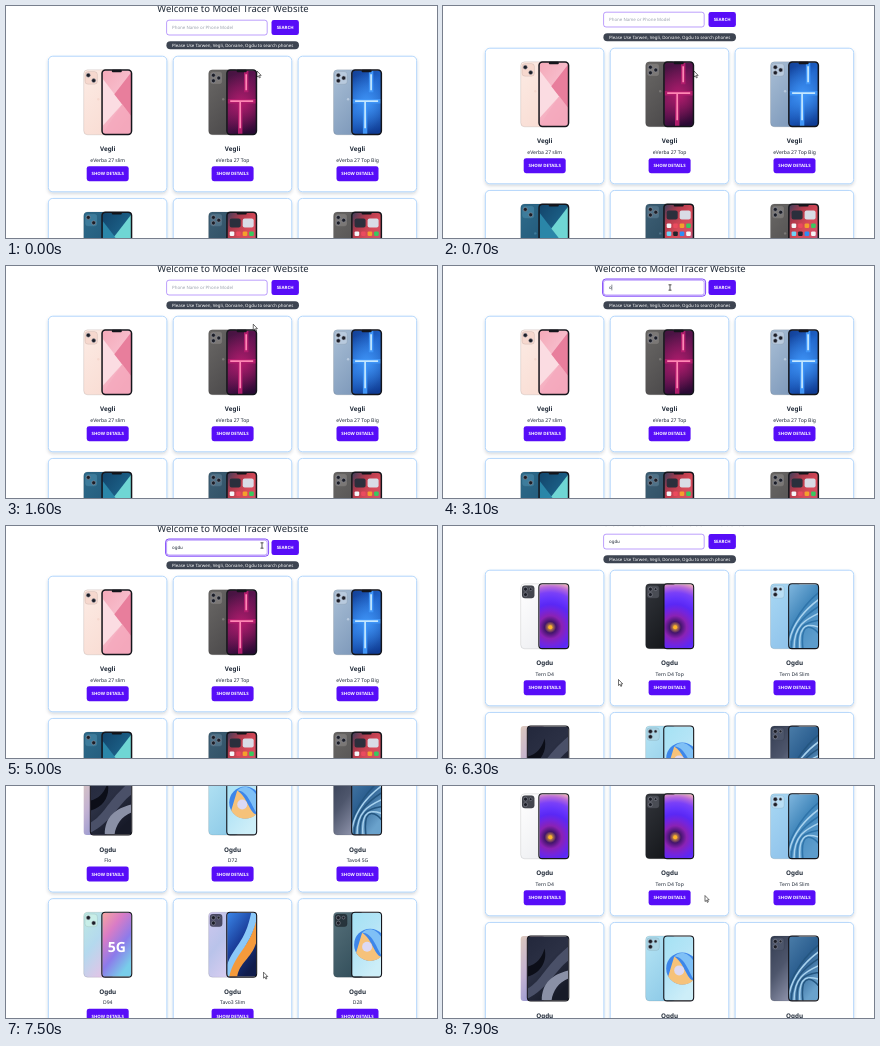
An HTML page that plays this animation: 431x232 px, repeating every 8 s.

```html
<!DOCTYPE html>
<html lang="en">
<head>
<meta charset="utf-8">
<title>Phone search</title>
<style>
  html, body { margin: 0; height: 100%; overflow: hidden; background: #fff; }
  #stage { display: block; width: 100vw; height: 100vh; }
  text { font-family: "Noto Sans", "Open Sans", sans-serif; fill: #1f2937; text-rendering: geometricPrecision; white-space: pre; }
  .mid { text-anchor: middle; }
  .btn { font-size: 4.42px; font-weight: 600; fill: #fff; }
</style>
</head>
<body>
<svg id="stage" viewBox="0 0 431 232" preserveAspectRatio="none">
  <defs id="defs">
    <filter id="shadow" x="-10%" y="-10%" width="120%" height="125%">
      <feDropShadow dx="0" dy="1.8" stdDeviation="1.4" flood-color="#334155" flood-opacity=".2"/>
    </filter>
  </defs>
  <g id="page"></g>
  <g id="cursor"></g>
</svg>
<script>
const LOOP = 8000, STEP = 100;
const PRIMARY = '#570df8';
const $ = id => document.getElementById(id);

// ---------- drawing helpers ----------
const rect = (x, y, w, h, r, fill, extra = '') =>
  `<rect x="${x}" y="${y}" width="${w}" height="${h}" rx="${r}" fill="${fill}" ${extra}/>`;
const circle = (x, y, r, fill, extra = '') => `<circle cx="${x}" cy="${y}" r="${r}" fill="${fill}" ${extra}/>`;
const path = (d, fill, extra = '') => `<path d="${d}" fill="${fill}" ${extra}/>`;
const beam = (d, color, width) => path(d, 'none', `stroke="${color}" stroke-width="${width}"`);
const label = (x, y, size, str, extra = '') => `<text x="${x}" y="${y}" font-size="${size}" ${extra}>${str}</text>`;
const button = (cx, y, w, str, fill) =>
  rect(cx - w / 2, y, w, 15, 2.4, fill) + `<text class="mid btn" x="${cx}" y="${y + 9.1}">${str}</text>`;

let gradients = 0;
const stops = colors => colors.map((c, i) =>
  `<stop offset="${i / (colors.length - 1)}" stop-color="${c}"/>`).join('');
function gradient(...colors) {
  const id = 'g' + gradients++;
  $('defs').insertAdjacentHTML('beforeend',
    `<linearGradient id="${id}" x2=".6" y2="1">${stops(colors)}</linearGradient>`);
  return `url(#${id})`;
}
function radial(cx, cy, r, ...colors) {
  const id = 'g' + gradients++;
  $('defs').insertAdjacentHTML('beforeend',
    `<radialGradient id="${id}" gradientUnits="userSpaceOnUse" cx="${cx}" cy="${cy}" r="${r}">${stops(colors)}</radialGradient>`);
  return `url(#${id})`;
}

// ---------- wallpapers, on a 29 x 64 screen ----------
const fillScreen = (...colors) => rect(0, 0, 29, 64, 0, gradient(...colors));

const folds = (base, light, dark, accent) => fillScreen(...base) +
  path('M0 8L20 34L0 56Z', light) + path('M29 2L12 24L29 46Z', dark) +
  path('M0 64L20 34L29 46V64Z', accent, 'opacity=".8"');

const beams = (base, glow, core) => fillScreen(...base) +
  rect(0, 0, 29, 64, 0, radial(15, 33, 30, glow, glow + '00')) +
  beam('M19 0V22M0 31H29M13 31V64', glow, 4.4) +
  beam('M19 4V20M3 31H26M13 31V58', core, 1.7);

function homeScreen() {
  const colors = ['#f5f5f7', '#39c860', '#2e8df5', '#f4a02c', '#20242c', '#ea4b5e', '#6fd3f7'];
  let icons = rect(2.5, 6, 11, 9, 2, '#2b2f3c') + rect(15.5, 6, 11, 9, 2, '#d9dce6');
  for (let i = 0; i < 16; i++)
    icons += rect(2.5 + i % 4 * 6.5, 19 + (i >> 2) * 8, 4.6, 4.6, 1.2, colors[i * 5 % 7]);
  icons += rect(1.2, 55, 26.6, 7.5, 2, '#d5d9e8', 'opacity=".55"');
  for (let i = 0; i < 4; i++) icons += rect(2.5 + i * 6.5, 56.4, 4.6, 4.6, 1.2, colors[(i + 1) * 3 % 7]);
  return fillScreen('#3a3f5c', '#b03a4c', '#d84a58', '#d0506a', '#5c8ce0') +
    path('M29 34C14 36 6 46 4 55H29Z', '#4f86dc') + icons;
}

const eye = () => rect(0, 0, 29, 64, 0, radial(11, 43, 46,
  '#ffc030', '#43156c', '#8a22b4', '#7424dc', '#5a28f5', '#6634fc', '#7a40f8', '#b468dc', '#f6b8b4')) +
  circle(11, 43, 2, '#ffb52b');

const waves = (base, a, b) => fillScreen(...base) +
  [0, 1, 2, 3, 4, 5, 6].map(i => beam(`M${i * 3 - 4} 66C${-2 + i * 2} ${50 - i * 3} ${8 + i * 3} ${26 + i * 3} 30 ${8 + i * 7}`,
    i % 2 ? a : b, 1.5)).join('');

const disc = () => fillScreen('#a5e2f4', '#b4e4f6', '#cdeef8') +
  circle(18, 32, 16, '#3d86ea') + path('M4 40A16 16 0 0 0 29 44C22 42 20 26 10 20Z', '#f6c27a') +
  path('M10 20C20 20 24 34 29 42V24C24 16 16 14 10 20Z', '#7fc0f6') + circle(15, 34, 5, '#dcd9f4');

const flame = () => fillScreen('#3a86e8', '#1b3f9c', '#101c4c') +
  path('M0 64C4 40 22 40 29 6V30C24 46 12 50 10 64Z', '#f49a3c') +
  path('M0 52C6 34 18 30 24 0H29V8C22 36 8 40 2 64H0Z', '#8bc8f8');

const fiveG = () => fillScreen('#f6a7a0', '#d97cc6', '#8c7bea', '#78cdea') +
  label(14.5, 39, 14, '5G', 'class="mid" font-weight="700" style="fill:#fff"');

// ---------- devices, in card coordinates ----------
function camera(kind, color) {
  const lens = (x, y, r = 2) => circle(x, y, r, '#1b1d26', 'stroke="#9a9da8" stroke-width=".5"');
  const plate = rect(36.7, 15.4, 12.4, 12.6, 3, color, 'stroke="#0003" stroke-width=".4"');
  const lenses = {
    two: lens(40, 19) + lens(45.4, 24.4),
    three: lens(40.2, 19) + lens(40.2, 24.6) + lens(45.6, 21.8),
    tall: lens(40.2, 19) + lens(40.2, 24.4) + lens(45.4, 19, 1.4),
  };
  return plate + lenses[kind];
}

const screen = (x, w, art, bezel) =>
  `<svg x="${x + 1}" y="14" width="${w - 2}" height="64" viewBox="0 0 29 64" preserveAspectRatio="none">${art}</svg>` +
  rect(x + bezel / 2, 13 + bezel / 2, w - bezel, 66 - bezel, 3.4, 'none', `stroke="#14151b" stroke-width="${bezel}"`);

function phone({ back, cam, plate, art, notch }) {
  return rect(35.4, 13.6, 30, 65, 4, gradient(...back), 'stroke="#0003" stroke-width=".5"') +
    camera(cam, plate) +
    (notch ? circle(50, 43, 1.2, plate) : '') +
    screen(53, 31, art, notch ? 1.5 : 1.1) +
    (notch ? rect(63.5, 13.6, 10, 2.4, 1, '#14151b') : '');
}

const tablet = () => rect(35.4, 13.6, 24, 65, 3, gradient('#dcc8bc', '#c3b2d2', '#8f94d0')) +
  screen(41.5, 42.5, fillScreen('#23283c', '#2b3044', '#171a28') +
    path('M0 52C10 44 12 30 29 10V24C20 34 14 52 0 62Z', '#4a5068') +
    path('M10 64C10 46 18 38 29 34V42C22 46 18 54 17 64Z', '#8a90a6') +
    path('M0 30C6 28 10 22 12 12C14 24 10 36 0 40Z', '#0c0e18'), 1.1);

const A = 'Vegli', B = 'Ogdu';
const dark = ['#6a6866', '#4c4a4b'], navy = ['#3e6076', '#27465a'];
const steel = ['#7fb6de', '#4388bc', '#5c9ccc'], night = ['#4a7ca8', '#2c5f90', '#6aa2cc'];
const catalog = {
  [A]: [
    ['eVerba 27 slim', phone({ back: ['#fcebe4', '#f9ddd4'], cam: 'two', plate: '#f6d8ce', notch: 1,
      art: folds(['#f4a9b8', '#f7bccb', '#f3a0b4'], '#fbdce2', '#e87e9c', '#f6aabe') })],
    ['eVerba 27 Top', phone({ back: dark, cam: 'three', plate: '#7b7876', notch: 1,
      art: beams(['#43143f', '#5c1450', '#2a0a34'], '#b01c6c', '#ff86b4') })],
    ['eVerba 27 Top Big', phone({ back: ['#a9bfd6', '#7f9abb'], cam: 'three', plate: '#b8cade', notch: 1,
      art: beams(['#123e94', '#1e62c8', '#0f3c94'], '#3f94f6', '#c4e8ff') })],
    ['eVerba 27', phone({ back: ['#2f6c8c', '#1d5374'], cam: 'two', plate: '#3d7c9c', notch: 1,
      art: folds(['#12446a', '#1b5f86', '#1c6f9c'], '#2a86a8', '#6fd6d4', '#c996c0') })],
    ['eVerba 26 Top Big', phone({ back: navy, cam: 'three', plate: '#4f7187', notch: 1, art: homeScreen() })],
    ['eVerba 26 Top', phone({ back: dark, cam: 'three', plate: '#7b7876', notch: 1, art: homeScreen() })],
  ],
  [B]: [
    ['Tern D4', phone({ back: ['#ffffff', '#eeeff2'], cam: 'tall', plate: '#44464e', art: eye() })],
    ['Tern D4 Top', phone({ back: ['#32353b', '#15171b'], cam: 'tall', plate: '#494c54', art: eye() })],
    ['Tern D4 Slim', phone({ back: ['#a8d8f4', '#8fc2ea'], cam: 'tall', plate: '#b9def5', art: waves(steel, '#a8d2ee', '#2f74aa') })],
    ['Flo', tablet()],
    ['D72', phone({ back: ['#b5e4f4', '#8fcbe8'], cam: 'tall', plate: '#a9d3e4', art: disc() })],
    ['Tavo4 5G', phone({ back: ['#343d52', '#4e566c', '#8d92aa'], cam: 'tall', plate: '#4c556a', art: waves(night, '#a8d2ee', '#245680') })],
    ['D94', phone({ back: ['#bde9e2', '#b4d9ee', '#e3c3e6'], cam: 'two', plate: '#c8eee8', art: fiveG() })],
    ['Tavo3 Slim', phone({ back: ['#cfc7ee', '#b9c3ea', '#d8cdf0'], cam: 'tall', plate: '#4c4c66', art: flame() })],
    ['D28', phone({ back: ['#56707a', '#34505c'], cam: 'tall', plate: '#27343c', art: disc() })],
  ],
};

const card = (brand, [name, art], i) => `<g transform="translate(${42.3 + i % 3 * 124.9} ${50.2 + Math.floor(i / 3) * 142.2})">
  ${rect(0, 0, 118.6, 135.6, 4.5, '#fff', 'stroke="#b2d6fc" stroke-width="1" filter="url(#shadow)"')}${art}
  ${label(59.4, 95.3, 6.31, brand, 'class="mid" font-weight="600"')}
  ${label(59.4, 105.5, 5.05, name, 'class="mid"')}
  ${button(59.4, 110, 42, 'SHOW DETAILS', PRIMARY)}</g>`;
const results = brand => `<g id="${brand}">${catalog[brand].map((item, i) => card(brand, item, i)).join('')}</g>`;

$('page').innerHTML =
  label(227, 6, 9.5, 'Welcome to Model Tracer Website', 'class="mid"') +
  rect(159.6, 13, 103, 17.2, 3.2, 'none', `id="focus" stroke="${PRIMARY}" stroke-width=".75"`) +
  rect(160.6, 14.2, 100.6, 14.8, 2.4, '#fff', `stroke="${PRIMARY}" stroke-width=".4"`) +
  label(166, 23.2, 4.42, '', 'id="query"') +
  rect(166, 18.6, .5, 5.8, 0, '#1f2937', 'id="caret"') +
  button(279.2, 14.1, 27.4, 'SEARCH', PRIMARY) +
  rect(160.4, 35.3, 132.6, 7.9, 3.95, '#3d4451') +
  label(226.7, 40.8, 4.42, `Please Use Tarwen, ${A}, Dorvane, ${B} to search phones`, 'class="mid" style="fill:#fff"') +
  results(A) + results(B) +
  button(226.7, 485.6, 27, 'SEE ALL', '#f000b8');

const outline = 'stroke="#111" stroke-width=".6" stroke-linejoin="round"';
const pointers = {
  arrow: path('M0 0V6L1.4 4.8L2.3 6.9L3.3 6.5L2.4 4.4H4.2Z', '#fff', outline),
  beam: beam('M-1.5 -2.7H1.5M0 -2.7V2.7M-1.5 2.7H1.5', '#111', .7),
  hand: path('M-.7 0H.6V2.4L3.2 3.2V5L2.3 7H-1.2L-2.8 4.4L-2 3.8L-.7 4.6Z', '#fff', outline),
};

// ---------- timeline ----------
const scrollKeys = [[600, 0], [1060, 66], [1500, 0], [6000, 0], [6300, 6], [6400, 30], [6500, 30], [6800, 280], [7300, 280], [7900, 56]];
const cursorKeys = [[1500, 251, 65], [1900, 227, 21.5], [4500, 227, 21.5], [5000, 256, 19.5], [5400, 279, 20],
  [5450, 279, 20], [5800, 175.5, 153.5], [6400, 175.5, 153.5], [6800, 256, 213], [7300, 256, 213], [7900, 262, 109.5]];
const typedAt = [3100, 3600, 3800, 4000];

function tween(keys, t) {
  const next = keys.findIndex(k => k[0] > t);
  if (next < 0) return keys.at(-1).slice(1);
  if (next === 0) return keys[0].slice(1);
  const a = keys[next - 1], b = keys[next];
  const p = (t - a[0]) / (b[0] - a[0]), e = p * p * (3 - 2 * p);
  return a.slice(1).map((v, i) => v + (b[i + 1] - v) * e);
}
const within = (t, from, to) => t >= from && t < to;
const show = (id, on) => $(id).setAttribute('visibility', on ? 'visible' : 'hidden');

function render(t) {
  const [scroll] = tween(scrollKeys, t), [x, y] = tween(cursorKeys, t);
  $('page').setAttribute('transform', `translate(0 ${-scroll})`);

  const query = B.toLowerCase().slice(0, typedAt.filter(k => t >= k).length);
  $('query').textContent = query || 'Phone Name or Phone Model';
  $('query').style.fill = query ? '#1f2937' : '#9ca3af';
  $('caret').setAttribute('x', 166 + (query ? $('query').getComputedTextLength() : 0));
  show('caret', within(t, 1900, 2500) || within(t, 2900, 4600) || within(t, 5100, 5400));
  show('focus', within(t, 1900, 5400));
  show(A, t < 5500);
  show(B, t >= 5500);

  const overBar = scroll < 10 && within(y, 14, 29);
  const kind = overBar && within(x, 161, 261) ? 'beam' : overBar && within(x, 266, 293) ? 'hand' : 'arrow';
  $('cursor').innerHTML = pointers[kind];
  $('cursor').setAttribute('transform', `translate(${x} ${y})`);
}

const start = performance.now();
let shown = -1;
function frame() {
  const t = Math.floor((performance.now() - start) % LOOP / STEP) * STEP;
  if (t !== shown) render(shown = t);
  requestAnimationFrame(frame);
}
frame();
</script>
</body>
</html>
```
